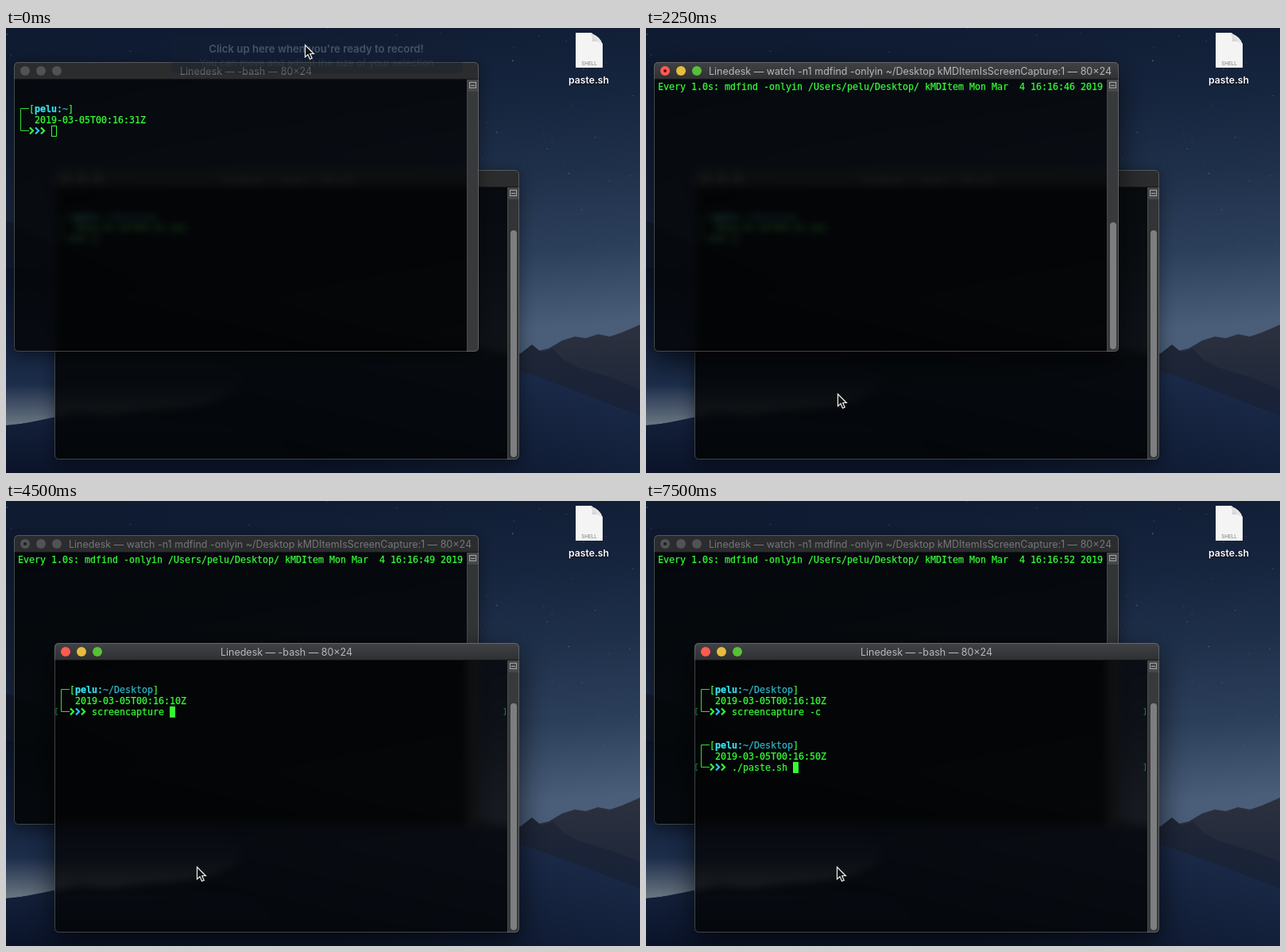
Recreate the animation shown at these times as an HTML page with a canvas. Size 798 by 561 pixels, loop 8 s.

```html
<!DOCTYPE html>
<html lang="en">
<head>
<meta charset="utf-8">
<title>Two shell windows</title>
<style>
html, body { margin: 0; width: 100%; height: 100%; overflow: hidden; background: #0f1a30; }
canvas { display: block; }
</style>
</head>
<body>
<canvas id="stage" width="798" height="561"></canvas>
<script>
const W = 798, H = 561, LOOP = 8000, STEP = 250;
const canvas = document.getElementById('stage'), ctx = canvas.getContext('2d');
const MONO = '11.63px "DejaVu Sans Mono", monospace';
const UI = 'Inter, sans-serif';
const GREEN = '#35fb35', CYAN = '#35e3ee', TEAL = '#2db4c4';
const APP = 'Linedesk', USER = 'pelu';
const COL = 7, ROW = 14;

// Value of the last [time, value] entry that has begun
const at = (list, t) => list.filter(e => e[0] <= t).pop()[1];

const WATCH = 'watch -n1 mdfind -onlyin ~/Desktop/ kMDItemIsScreenCapture:1';
const WATCH_TITLE = `${APP} — watch -n1 mdfind -onlyin ~/Desktop kMDItemIsScreenCapture:1 — 80×24`;
const BUSY_TITLE = `${APP} — mdfind ◂ watch -n1 mdfind -onlyin ~/Desktop kMDItemIsScreenCapture:…`;
const BASH_TITLE = `${APP} — -bash — 80×24`;
const SECONDS = [[0, 45], [2000, 46], [2750, 47], [3500, 48], [4250, 49], [5000, 50], [6250, 51], [7250, 52]];
const COMMAND1 = [[0, ''], [750, 'w'], [1000, WATCH]];
const COMMAND2 = [[0, ''], [4000, 's'], [4250, 'scree'], [4500, 'screencapture '], [5000, 'screencapture -c']];
const COMMAND3 = [[0, ''], [6000, '.'], [6250, './'], [6500, './p'], [7000, './paste.sh ']];
const POINTER = [[0, [376, 21]], [250, [333, 108]], [1750, [318, 176]], [2000, [264, 380]], [2250, [241, 461]], [2500, [240, 461]]];

function text(s, x, y, color, font, align = 'left') {
  ctx.font = font;
  ctx.fillStyle = color;
  ctx.textAlign = align;
  ctx.fillText(s, x, y);
}

function line(points, color, width = 1) {
  ctx.beginPath();
  points.forEach(p => ctx.lineTo(...p));
  ctx.strokeStyle = color;
  ctx.lineWidth = width;
  ctx.stroke();
}

function rect(x, y, w, h, color) {
  ctx.fillStyle = color;
  ctx.fillRect(x, y, w, h);
}

function round(x, y, w, h, r, color) {
  ctx.beginPath();
  ctx.roundRect(x, y, w, h, r);
  ctx.fillStyle = color;
  ctx.fill();
}

function fade(x0, y0, x1, y1, ...colors) {
  const g = ctx.createLinearGradient(x0, y0, x1, y1);
  colors.forEach((c, i) => g.addColorStop(i / (colors.length - 1), c));
  return g;
}

function shape(d, fill) {
  ctx.fillStyle = fill;
  ctx.fill(new Path2D(d));
}

function wallpaper() {
  rect(0, 0, W, H, fade(500, 0, 530, 390, '#101d35', '#16253e', '#1f304b', '#2c3f5a', '#4a5d79'));
  rect(0, 0, W, H, fade(0, 0, 600, 0, 'rgba(14,24,44,.45)', 'rgba(14,24,44,0)'));
  let seed = 11;
  const rnd = () => (seed = seed * 16807 % 2147483647) / 2147483647;
  for (let i = 0; i < 120; i++) {
    const x = rnd() * W, y = rnd() * 350, s = rnd() < .12 ? 1.5 : 1;
    rect(x, y, s, s, `rgba(180,200,225,${.1 + rnd() * .35})`);
  }
  shape('M0 243Q30 250 62 276L250 330L480 385L648 412L683 404L700 394L716 389L730 391L745 386L760 389L775 384L798 374V561H0Z',
    fade(0, 375, 0, 460, '#2c313e', '#1f273a'));
  shape('M600 420L648 410L662 399L674 409L688 404L702 418L720 428L760 440L798 455V561H600Z',
    fade(0, 400, 0, 480, '#1f2636', '#182238'));
  shape('M0 243Q30 250 62 276L150 310L260 400V470H0Z', fade(0, 243, 0, 320, '#141d2e', '#101b30'));
  shape('M0 303Q40 300 90 318Q330 350 600 417Q680 442 798 489V561H0Z',
    fade(400, 350, 350, 561, '#1c2c4c', '#13203a', '#0a1226'));
  shape('M0 303Q40 300 90 318L300 440Q290 478 180 482L0 501Z',
    fade(0, 303, 0, 498, '#0c162a', '#101e38', '#14233f', '#1c2d4a', '#66727f'));
  shape('M0 502Q35 497 90 484L300 500L400 561H0Z', fade(0, 490, 0, 561, '#14213c', '#0a1328'));
}

function desktopFile() {
  shape('M717 6H737L751 20V50H717Z', '#f4f4f4');
  shape('M735 6Q739 10 738 17Q746 16 751 21Q749 11 735 6Z', fade(736, 17, 747, 7, '#c4c4c4', '#fff'));
  text('SHELL', 734, 47, '#777', `6.3px ${UI}`, 'center');
  ctx.save();
  ctx.shadowColor = '#000';
  ctx.shadowBlur = 3;
  ctx.shadowOffsetY = 1;
  text('paste.sh', 733.5, 70, '#fff', `600 12.2px ${UI}`, 'center');
  ctx.restore();
}

// Frosted window of 585 by 365 with its origin moved to 0,0 for the content
function frame(x, y, { title, active, front, busy, thumb, content }) {
  const w = 585, h = 365, bar = 22;
  const box = new Path2D();
  box.roundRect(x, y, w, h, 5);

  ctx.save();
  const outside = new Path2D(box);
  outside.rect(0, 0, W, H);
  ctx.clip(outside, 'evenodd');
  ctx.shadowColor = `rgba(0,0,0,${active ? .65 : .45})`;
  ctx.shadowBlur = active ? 36 : 20;
  ctx.shadowOffsetY = active ? 12 : 5;
  ctx.fill(box);
  ctx.restore();

  ctx.save();
  ctx.clip(box);
  ctx.filter = 'blur(5px) saturate(.7)';
  ctx.drawImage(canvas, 0, 0);
  ctx.filter = 'none';
  ctx.translate(x, y);
  rect(0, 0, w, h, `rgba(2,4,5,${front ? .74 : .83})`);
  rect(0, 0, w, bar, active ? fade(0, 0, 0, bar, '#414245', '#2f3032') : '#2a2c2e');
  rect(0, bar - 1, w, 1, '#151617');

  const colors = active ? ['#ff5b52', '#e6bd3c', '#57c038'] : Array(3).fill('#505255');
  colors.forEach((c, i) => round(8 + 20 * i, 5, 12, 12, 6, c));
  if (busy) round(12, 9, 4, 4, 2, active ? '#6e0c08' : '#1d1f20');
  const long = title.length > 40;
  text(title, long ? 69 : w / 2 - .5, 16, active ? '#b6b7b9' : '#747678', `12.5px ${UI}`, long ? 'left' : 'center');

  rect(570, bar, 15, h - bar, front ? '#38393b' : '#323436');
  rect(570, bar, 1, h - bar, '#4a4b4d');
  rect(570, bar, 15, 15, '#47484a');
  ctx.strokeStyle = '#a5a6a8';
  ctx.lineWidth = 1;
  ctx.strokeRect(573.5, 25.5, 8, 7);
  line([[575, 29.5], [580, 29.5]], '#a5a6a8');
  if (thumb) round(574, thumb, 8, 362 - thumb, 4, '#7c7e80');

  content();
  ctx.restore();
  ctx.lineWidth = 1;
  ctx.strokeStyle = 'rgba(150,155,160,.42)';
  ctx.beginPath();
  ctx.roundRect(x + .5, y + .5, w - 1, h - 1, 5);
  ctx.stroke();
}

const cellX = col => 5 + COL * col;
const cellY = row => 24 + ROW * row;

// A thin outline gives the glyphs their slightly heavier weight
function put(s, col, row, color = GREEN, weight = '') {
  const x = cellX(col), y = cellY(row) + 11;
  text(s, x, y, color, `${weight} ${MONO}`);
  ctx.strokeStyle = color;
  ctx.lineWidth = .25;
  ctx.strokeText(s, x, y);
}

function cursor(col, row, hollow) {
  const x = cellX(col), y = cellY(row);
  if (!hollow) return rect(x, y, COL, ROW, GREEN);
  ctx.strokeStyle = GREEN;
  ctx.lineWidth = 1;
  ctx.strokeRect(x + .5, y + .5, COL - 1, ROW - 1);
}

function prompt(row, dir, date, command, marked) {
  const y = cellY(row) + 6.5, low = y + 2 * ROW;
  line([[19, y], [8.5, y], [8.5, low], [19, low]], '#2ee02e');
  put('[', 2, row);
  put(USER, 3, row, CYAN, 'bold');
  put(':', 7, row, CYAN);
  put(dir, 8, row, TEAL);
  put(']', 8 + dir.length, row);
  put(date, 3, row + 1);
  [GREEN, '#36c3f0', GREEN].forEach((c, i) => {
    const x = cellX(2 + i) + 1;
    line([[x, low - 4], [x + 4, low], [x, low + 4]], c, 2.2);
  });
  put(command, 6, row + 2);
  if (marked) for (const [a, b] of [[4, 2], [565.5, 567.5]])
    line([[a, low - 4], [b, low - 4], [b, low + 4], [a, low + 4]], '#1f7a35');
}

function watchWindow(t) {
  const running = t >= 1750;
  const busy = [2750, 3500, 4250, 5000, 6250, 7250].includes(t);
  frame(10, 43, {
    title: !running ? BASH_TITLE : busy ? BUSY_TITLE : WATCH_TITLE,
    active: t >= 250 && t < 2500,
    front: t < 2500,
    busy: running,
    thumb: running && t < 2750 ? 202 : 0,
    content() {
      if (running) {
        put(`Every 1.0s: mdfind -onlyin /Users/${USER}/Desktop/ kMDItem Mon Mar  4 16:16:${at(SECONDS, t)} 2019`, 0, 0);
        return;
      }
      const command = at(COMMAND1, t), entered = t >= 1500;
      prompt(2, '~', '2019-03-05T00:16:31Z', command, entered);
      cursor(entered ? 0 : 6 + command.length, entered ? 5 : 4, t < 250);
    }
  });
}

function bashWindow(t) {
  const active = t >= 2500;
  frame(61, 179, {
    title: BASH_TITLE,
    active,
    front: active,
    thumb: 76,
    content() {
      const first = at(COMMAND2, t), second = at(COMMAND3, t);
      prompt(2, '~/Desktop', '2019-03-05T00:16:10Z', first, t >= 4500);
      if (t >= 5750) {
        prompt(7, '~/Desktop', '2019-03-05T00:16:50Z', second, t >= 7000);
        cursor(6 + second.length, 9);
      } else if (t >= 5250) cursor(0, 5);
      else cursor(6 + first.length, 4, !active);
    }
  });
}

function hint() {
  round(208, 10, 367, 47, 5, 'rgba(22,32,48,.3)');
  text("Click up here when you're ready to record!", 390.5, 31, '#465267', `600 13.2px ${UI}`, 'center');
  text('You can move and adjust the size of your selection', 391, 48, 'rgba(80,92,112,.32)', `12.3px ${UI}`, 'center');
}

function pointer([x, y]) {
  const p = new Path2D('M0 0V15.2L3.5 12L6 17.8L8.7 16.7L6.3 11H10.9Z');
  ctx.save();
  ctx.translate(x + .5, y + .5);
  ctx.fillStyle = '#111';
  ctx.fill(p);
  ctx.strokeStyle = '#f2f2f2';
  ctx.lineWidth = 1.2;
  ctx.stroke(p);
  ctx.restore();
}

function draw(t) {
  wallpaper();
  desktopFile();
  const order = t < 2500 ? [bashWindow, watchWindow] : [watchWindow, bashWindow];
  order.forEach(show => show(t));
  if (t < 250) hint();
  pointer(at(POINTER, t));
}

let start, shown = -1;
function tick(now) {
  start ??= now;
  const t = Math.floor((now - start) % LOOP / STEP) * STEP;
  if (t !== shown) draw(shown = t);
  requestAnimationFrame(tick);
}
draw(0);
requestAnimationFrame(tick);
</script>
</body>
</html>
```
